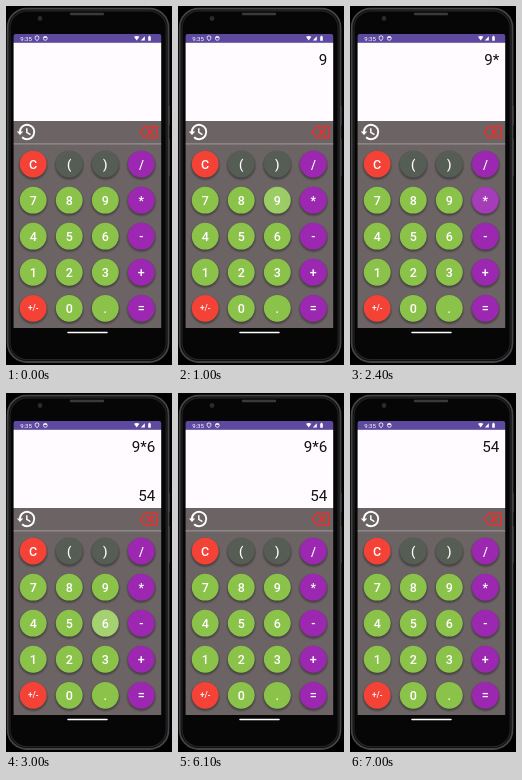
These frames come from a looping animation (166 by 359 pixels, 8000 ms). An HTML page:

```html
<!DOCTYPE html>
<html lang="en">
<head>
<meta charset="utf-8">
<title>Calculator</title>
<style>
  html, body { margin: 0; width: 100%; height: 100%; overflow: hidden; background: #000; }
  svg { display: block; width: 100vw; height: 100vh; }
  text { font-family: Roboto, sans-serif; }
  .key text { fill: #fff; font-weight: 500; font-size: 12.5px; text-anchor: middle; }
  .display text { fill: #111; font-size: 15.2px; text-anchor: end; opacity: 0; }

  .ripple { opacity: 0; animation: fade 8s step-end infinite; }
  .glow { fill: url(#glow); animation: glow 8s step-end infinite; animation-delay: inherit; }
  .flood { fill: #fff; opacity: 0; animation: flood 8s step-end infinite; animation-delay: inherit; }

  /* One picture step is 100 ms, 1.25% of the loop */
  @keyframes fade {
    0% { opacity: 0; }
    1.25% { opacity: 1; }
    5% { opacity: .9; }
    6.25% { opacity: .75; }
    7.5% { opacity: .6; }
    8.75% { opacity: .4; }
    10% { opacity: .2; }
    11.25%, 100% { opacity: 0; }
  }
  @keyframes glow { 0% { opacity: 1; } 2.5%, 100% { opacity: 0; } }
  @keyframes flood { 0% { opacity: 0; } 2.5%, 100% { opacity: .26; } }

  .display text { animation: 8s step-end infinite; }
  .display .first { animation-name: first; }
  .display .operator { animation-name: operator; }
  .display .full { animation-name: full; }
  .display .answer { animation-name: answer; }
  @keyframes first { 0% { opacity: 0; } 6.25% { opacity: 1; } 22.5%, 100% { opacity: 0; } }
  @keyframes operator { 0% { opacity: 0; } 22.5% { opacity: 1; } 33.75%, 100% { opacity: 0; } }
  @keyframes full { 0% { opacity: 0; } 33.75% { opacity: 1; } 77.5%, 100% { opacity: 0; } }
  @keyframes answer { 0% { opacity: 0; } 77.5%, 100% { opacity: 1; } }
</style>
</head>
<body>
<svg viewBox="0 0 166 359" preserveAspectRatio="none">
  <defs>
    <radialGradient id="glow">
      <stop offset="0" stop-color="#fff" stop-opacity=".5"/>
      <stop offset=".5" stop-color="#fff" stop-opacity=".28"/>
      <stop offset=".95" stop-color="#fff" stop-opacity="0"/>
    </radialGradient>
    <radialGradient id="shadow">
      <stop offset=".8" stop-opacity=".36"/>
      <stop offset="1" stop-opacity="0"/>
    </radialGradient>
    <clipPath id="screen"><rect x="7.6" y="28" width="147.6" height="303" rx="2"/></clipPath>
  </defs>

  <!-- Phone body -->
  <rect width="166" height="359"/>
  <path d="M163.3 100V119M163.3 133V170" stroke="#2c2c2e" stroke-width="1.5"/>
  <rect x="1.7" y="2.6" width="160.8" height="353.4" rx="19" fill="#0b0b0c" stroke="#444447" stroke-width="1.8"/>
  <rect x="4" y="4.9" width="156.2" height="348.8" rx="17" fill="#060607" stroke="#242426" stroke-width="1.2"/>
  <circle cx="34" cy="12.5" r="2.4" fill="#2b2b2e"/>
  <path d="M65 8H97" stroke="#39393b" stroke-width="2.4" stroke-linecap="round"/>

  <g clip-path="url(#screen)">
    <rect x="7" y="28" width="149" height="9" fill="#5d499f"/>
    <rect x="7" y="36.8" width="149" height="78.2" fill="#fffbfe"/>
    <rect x="7" y="115" width="149" height="207" fill="#6c6464"/>
  </g>

  <!-- Status bar -->
  <g fill="#fff">
    <text x="14.2" y="34.9" font-size="6.1">9:35</text>
    <path d="M29.2 30.6l1.8-.8 1.8.8v1.8q-.4 1.6-1.8 2.2-1.4-.6-1.8-2.2z" fill="none" stroke="#fff" stroke-width=".8"/>
    <circle cx="39.3" cy="32.4" r="1.9" fill="none" stroke="#fff" stroke-width=".8"/>
    <path d="M37.6 31.8h3.4v-1.2h-3.4z"/>
    <path d="M128 30.8q2.7-1.6 5.4 0l-2.7 3.8z"/>
    <path d="M134.8 34.6h4v-4.3z"/>
    <path d="M142.2 30.4h.7v-.6h1.2v.6h.7v4.4h-2.6z"/>
  </g>

  <!-- Display -->
  <g class="display">
    <text class="first" x="149.3" y="58.8">9</text>
    <text class="operator" x="149.3" y="58.8">9*</text>
    <text class="full" x="149.3" y="58.8">9*6</text>
    <text class="full" x="149.3" y="108.3">54</text>
    <text class="answer" x="149.3" y="58.8">54</text>
  </g>

  <!-- Toolbar -->
  <g fill="none" stroke="#fff" stroke-width="1.9">
    <path d="M13.9 126a7.2 7.2 0 1 1 2.2 5.2"/>
    <path d="M20.8 122.2v4.2l3.6 2.2" stroke-width="1.5"/>
    <path d="M10.8 125.5h6.4l-3.2 3.5z" fill="#fff" stroke="none"/>
  </g>
  <g fill="none" stroke="#e5302d" stroke-width="1.5">
    <path d="M138.6 120.4H151.2V131.8H138.6L134.2 126.1Z"/>
    <path d="M140.9 122.9l6.4 6.4m0-6.4l-6.4 6.4" stroke-width="1.9"/>
  </g>
  <path d="M7.6 137.9H155.2" stroke="#a8a2a2" stroke-width=".9"/>

  <g id="keys"></g>
  <path d="M62 326.5H101" stroke="#fff" stroke-width="1.5" stroke-linecap="round"/>
</svg>

<script>
  const RED = '#f44336', GREEN = '#8bc34a', GREY = '#555d55', PURPLE = '#9c27b0';
  const rows = ['C ( ) /', '7 8 9 *', '4 5 6 -', '1 2 3 +', '+/- 0 . ='];
  const pressedAt = { '9': 400, '*': 1700, '6': 2600, '=': 6100 };

  function colourOf(label, column) {
    if (column === 3) return PURPLE;
    if (label === 'C' || label === '+/-') return RED;
    return '()'.includes(label) ? GREY : GREEN;
  }

  function ripple(label) {
    if (!(label in pressedAt)) return '';
    return `<g class="ripple" style="animation-delay:${pressedAt[label]}ms">
      <circle class="glow" r="13.4"/><circle class="flood" r="13.4"/></g>`;
  }

  function key(label, column, row) {
    const x = 27.2 + 36.05 * column, y = 158.1 + 36.05 * row;
    const small = label === '+/-';
    return `<g class="key" transform="translate(${x} ${y})">
      <circle cy="1.4" r="15.6" fill="url(#shadow)"/>
      <circle r="13.4" fill="${colourOf(label, column)}"/>
      ${ripple(label)}
      <text y="${small ? 2.8 : 4.4}"${small ? ' style="font-size:8.2px"' : ''}>${label}</text>
    </g>`;
  }

  document.getElementById('keys').innerHTML = rows
    .map((line, row) => line.split(' ').map((label, column) => key(label, column, row)).join(''))
    .join('');
</script>
</body>
</html>
```
